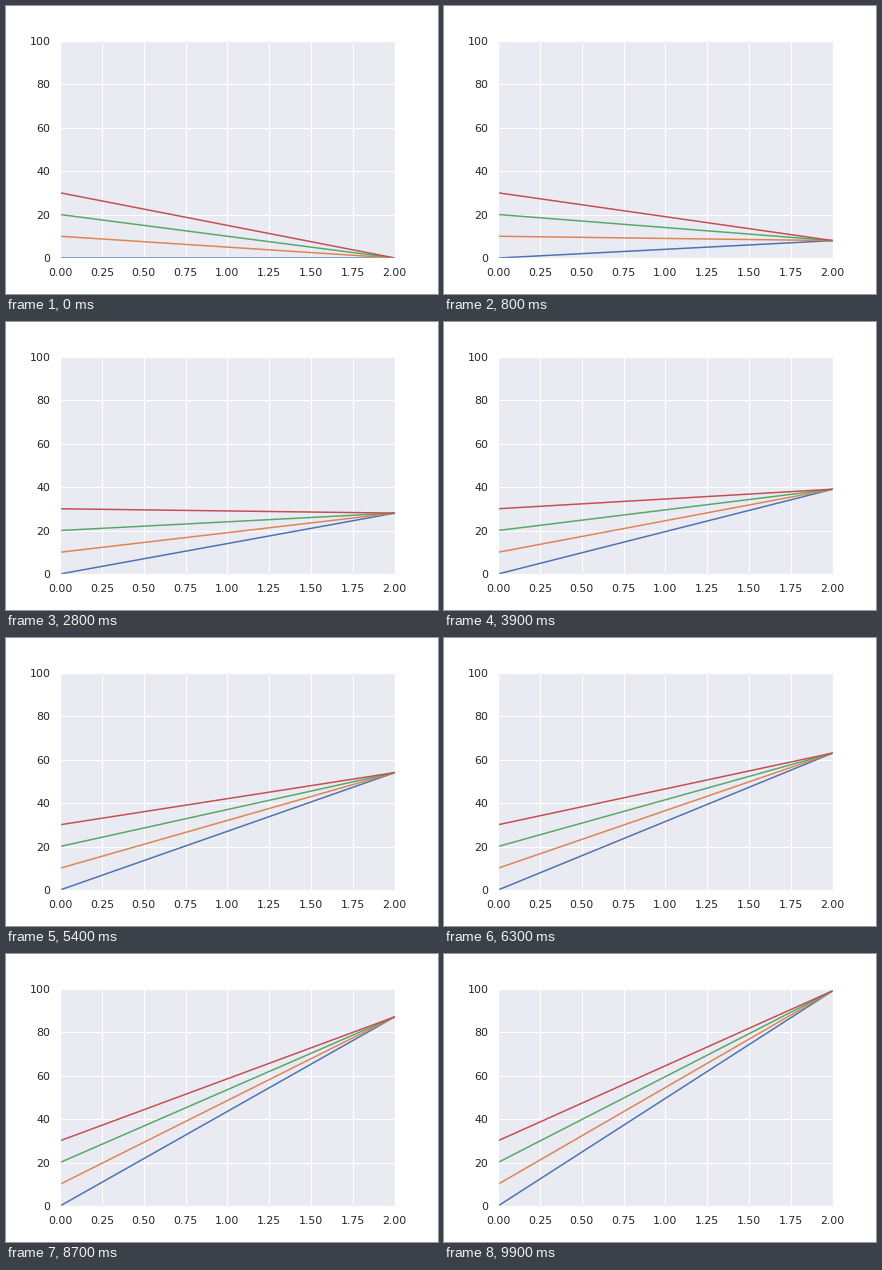
A matplotlib script that plays this animation: 432x288 px, repeating every 10 s.

```python
import matplotlib.pyplot as plt
from matplotlib.animation import FuncAnimation

FRAMES, INTERVAL = 100, 100
STARTS = [0, 10, 20, 30]
COLORS = ["#4C72B0", "#DD8452", "#55A868", "#C44E52"]
TEXT = "#262626"

plt.rcParams.update({
    "font.family": "DejaVu Sans",
    "axes.facecolor": "#EAEAF2",
    "axes.edgecolor": "white",
    "axes.linewidth": 1.25,
    "axes.axisbelow": True,
    "axes.grid": True,
    "grid.color": "white",
    "grid.linewidth": 1,
    "lines.linewidth": 1.5,
    "lines.solid_capstyle": "round",
})

fig, ax = plt.subplots(figsize=(6, 4), dpi=72)
fig.subplots_adjust(left=0.125, right=0.9, bottom=0.125, top=0.88)
ax.set_xlim(0, 2)
ax.set_ylim(0, 100)
ax.tick_params(length=6, pad=3.5, labelsize=11, labelcolor=TEXT,
               bottom=False, left=False)

lines = [ax.plot([0, 2], [y, 0], color=c)[0] for y, c in zip(STARTS, COLORS)]


def update(i):
    # All lines meet at the right edge, one unit higher each step.
    for line, start in zip(lines, STARTS):
        line.set_data([0, 2], [start, i])
    return lines


anim = FuncAnimation(fig, update, frames=FRAMES, interval=INTERVAL,
                     init_func=lambda: update(0), repeat=True, repeat_delay=0)
plt.show()
```
